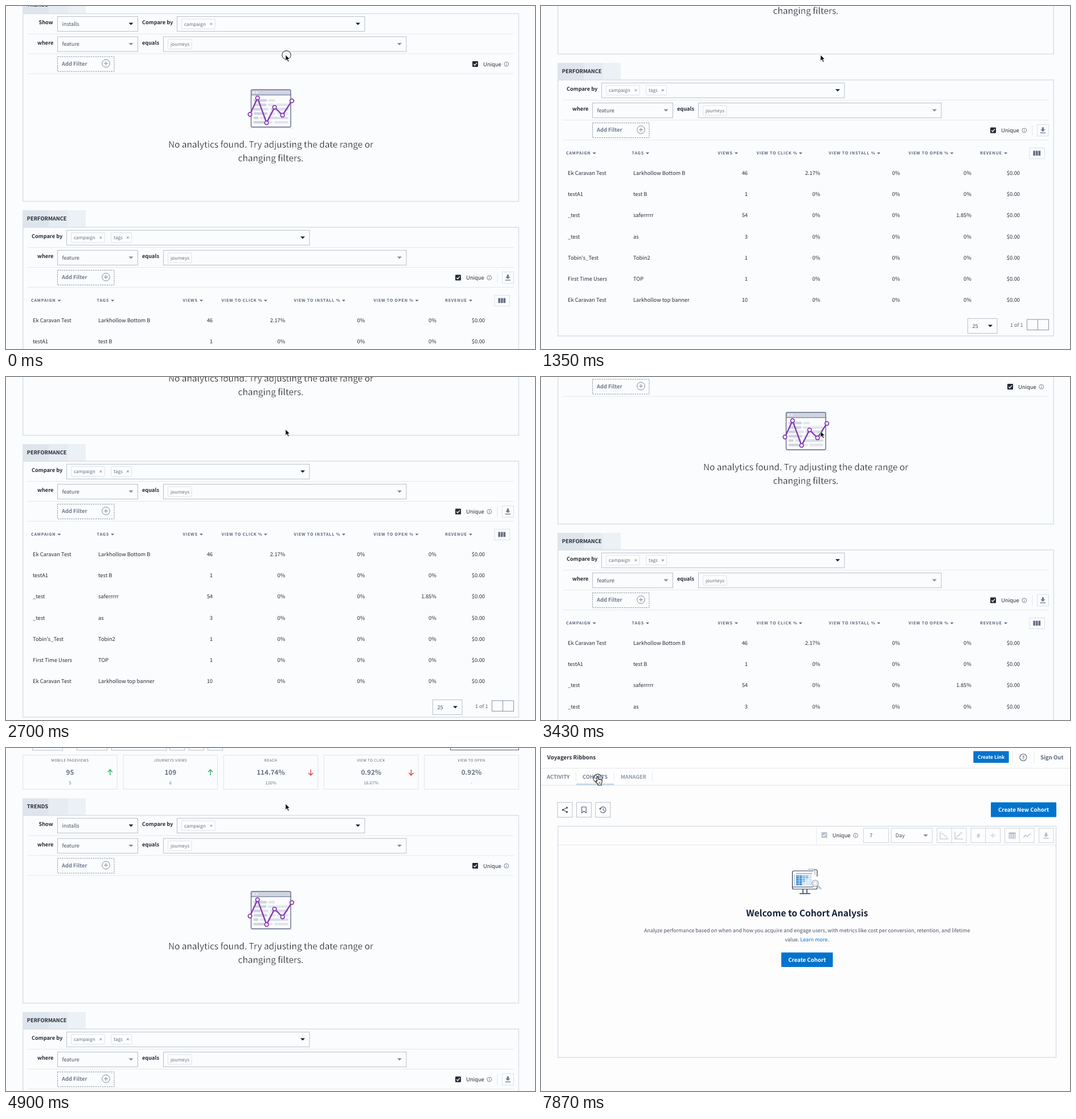
These frames come from a looping animation (929x603 px, 8 s). An HTML page:

```html
<!DOCTYPE html>
<html lang="en">
<head>
<meta charset="utf-8">
<title>Analytics dashboard</title>
<style>
html, body { margin: 0; width: 100%; height: 100%; overflow: hidden; background: #fbfcfd; }
svg { display: block; width: 100vw; height: 100vh; }
text { font-family: "Noto Sans CJK JP", "Noto Sans CJK SC", "Noto Sans CJK KR", "Noto Sans CJK", sans-serif;
  text-rendering: geometricPrecision; white-space: pre; }
</style>
</head>
<body>
<svg id="stage" viewBox="0 0 929 603" xmlns="http://www.w3.org/2000/svg"></svg>
<script>
const INK = '#262d39', MUTED = '#6c7888', BLUE = '#0273cc', EDGE = '#b7c1ca', PANEL = '#d8e0e7', RULE = '#e4e8ed';
const STEP = 148.5, LOOP = 8000;

const text = (x, y, s, size = 9.3, fill = INK, bold = 0, anchor = 'start', extra = '') =>
  `<text x="${x}" y="${y}" font-size="${size}" fill="${fill}" font-weight="${bold ? 700 : 400}" text-anchor="${anchor}" ${extra}>${s}</text>`;
const box = (x, y, w, h, stroke = EDGE, fill = 'none', extra = '') =>
  `<rect x="${x}" y="${y}" width="${w}" height="${h}" stroke="${stroke}" fill="${fill}" ${extra}/>`;
const path = (d, stroke, w = 1, fill = 'none', extra = '') =>
  `<path d="${d}" stroke="${stroke}" stroke-width="${w}" fill="${fill}" ${extra}/>`;
const circle = (x, y, r, stroke, w = 1, fill = 'none') =>
  `<circle cx="${x}" cy="${y}" r="${r}" stroke="${stroke}" stroke-width="${w}" fill="${fill}"/>`;
const group = (x, y, s, id = '') => `<g ${id && `id="${id}"`} transform="translate(${x} ${y})">${s}</g>`;
const hline = (x1, x2, y, c = RULE) => path(`M${x1} ${y}H${x2}`, c);
const vline = (x, y1, y2, c = RULE) => path(`M${x} ${y1}V${y2}`, c);
const caret = (x, y, c = '#15181d', r = 4) => path(`M${x - r} ${y - r / 2}h${2 * r}l${-r} ${r}z`, 'none', 0, c);

const select = (x, y, w, label = '', c) => box(x, y, w, 26) +
  text(x + 8, y + 16, label, 9.2, '#4a5260') + caret(x + w - 12, y + 13, c);
const chip = (x, y, w, label, closable) => box(x, y, w, 17, '#dde2e8', '#fdfdfe', 'rx="1"') +
  text(x + 4.5, y + 11.6, label, 8.2, '#66717f') +
  (closable ? path(`M${x + w - 8.4} ${y + 6.8}l3.6 3.6m0-3.6l-3.6 3.6`, '#66717f', .9) : '');
const info = (x, y) => circle(x, y, 3.9, '#65758a', .9) + path(`M${x} ${y - 2.3}v1M${x} ${y - .5}v2.7`, '#65758a', .9);
const check = (x, y, c = '#252c38') => box(x, y, 10, 10, 'none', c, 'rx="1"') +
  path(`M${x + 2.2} ${y + 5.2}l2 2l3.8-4.3`, '#fff', 1.3);
const button = (x, y, w, h, label, size) => box(x, y, w, h, 'none', BLUE, 'rx="1"') +
  text(x + w / 2, y + h / 2 + 3.4, label, size, '#fff', 1, 'middle');
const download = (x, y, c) => path(`M${x - 1.6} ${y - 5}h3.2v3.6h2.6l-4.2 4l-4.2-4h2.6z`, 'none', 0, c) +
  path(`M${x - 4.8} ${y + 4.7}h9.6`, c, 1.3);

function tools(x, y) {
  const c = '#4d5969', at = i => x + i * 33.4;
  return [0, 1, 2].map(i => box(at(i) - 13, y - 13, 26, 26)).join('') +
    path(`M${x + 3.5} ${y - 3.8}L${x - 3.5} ${y}l7 3.8`, c, 1.1) +
    [[3.5, -3.8], [-3.5, 0], [3.5, 3.8]].map(p => circle(x + p[0], y + p[1], 1.7, 'none', 0, c)).join('') +
    path(`M${at(1) - 3.8} ${y - 5}h7.6v10.3l-3.8-3l-3.8 3z`, c, 1.1) +
    path(`M${at(2) - 4.6} ${y - 2.4}a5.2 5.2 0 1 1 0 4.8M${at(2) + .5} ${y - 3}v3.4l2.5 1.5`, c, 1.1) +
    path(`M${at(2) - 7} ${y - 2.6}h4.6l-2.4 3z`, 'none', 0, c);
}

function calendar(x, y) {
  let s = box(x - 4.3, y - 3.6, 8.6, 8.4, '#3d4653') + box(x - 4.5, y - 4, 9, 2.4, 'none', '#3d4653') +
    path(`M${x - 2.2} ${y - 5.4}v2m4.4-2v2`, '#3d4653', 1.3);
  for (let i = 0; i < 2; i++) s += hline(x - 4, x + 4, y + .7 + i * 2, '#7d8793') + vline(x - 1.4 + i * 2.8, y - 1, y + 4, '#7d8793');
  return s;
}

function card(i, label, value, small, dir) {
  const x = 29.7 + i * 176.25, m = x + 82.8, c = dir > 0 ? '#27b561' : '#d34545';
  const arrow = dir ? path(`M${x + 153} ${163 + 5 * dir}v${-10 * dir}m-4 ${4.2 * dir}l4 ${-4.2 * dir}l4 ${4.2 * dir}`, c, 1.4) : '';
  return box(x, 132.5, 165.5, 60, '#e0e5ea') +
    text(m, 144, label, 6.35, '#566377', 0, 'middle', 'letter-spacing=".45"') +
    text(m, 167, value, 11.7, '#667283', 1, 'middle') +
    text(m, 184, small, 7.6, MUTED, 0, 'middle') + arrow;
}

// Tab, frame and the shared filter rows; y is the frame's top edge
function panel(y, h, title, first, shift) {
  const grey = '#85898f';
  return box(29, y - 30, 46, 30, 'none', '#dfe5ec') + box(75, y - 30, 34, 30, 'none', '#e6ecf2') +
    box(109, y - 30, 31, 30, 'none', '#ebf1f5') + text(36.8, y - 12.3, title, 9.3, INK, 1) +
    box(29.7, y, 870.6, h, PANEL, 'none', 'stroke-width="1.5"') + first +
    hline(38, 892, y + 35.5) +
    text(55, y + 54, 'where', 9.2, INK, 1) + select(90.5, y + 40.5, 141, 'feature', grey) +
    text(239, y + 54, 'equals', 9.2, INK, 1) + select(276.5, y + 40.5, 426.5, '', grey) + chip(284.5, y + 45, 41.5, 'journeys') +
    hline(38, 892, y + 70.5) +
    box(90.5, y + 75.5, 99.5, 26, '#8592a3', 'none', 'stroke-dasharray="2.4 1.5"') +
    text(98, y + 91.2, 'Add Filter', 9.3, '#6f7c8e', 1) +
    circle(175.5, y + 87.5, 6.8, '#7c899a') + path(`M172 ${y + 87.5}h7m-3.5-3.5v7`, '#7c899a') +
    check(819 - shift, y + 83.5) + text(838 - shift, y + 92.2, 'Unique', 9.4) + info(878.8 - shift, y + 88.7) +
    hline(38, 892, y + 105.5);
}

function chart() {
  const pts = [[428.5, 415.5], [441.7, 386.7], [457.6, 430.4], [471.6, 403], [485.6, 417], [502, 391.7]];
  let s = box(430.5, 372.3, 69.5, 65.5, 'none', '#fbfcfe') + box(430.5, 372.3, 69.5, 9, 'none', '#cfd4e1') +
    circle(435, 376.8, 1.3, 'none', 0, '#fff') + circle(440.5, 376.8, 1.3, 'none', 0, '#fff');
  const bar = (x, y, w, c) => box(x, y - 2.3, w, 4.6, 'none', c, 'rx="2.3"');
  for (let i = 0; i < 6; i++) {
    const y = 391 + i * 7.7, a = [24, 23, 13, 25, 9, 20][i];
    s += bar(434.5, y, a, '#ced3df') + bar(436.5 + a, y, 12, '#e1e5ee');
    if (i) s += bar(451 + a, y, 45 - a, i % 2 ? '#e1e5ee' : '#d9dde8');
  }
  return s + box(430.5, 372.3, 69.5, 65.5, '#626b8c', 'none', 'rx="2" stroke-width="1.4"') +
    hline(430, 501, 381.4, '#626b8c') + hline(426, 505, 439.6, '#e1e5ef') +
    path('M' + pts.join('L'), '#8539b0', 2.4, 'none', 'stroke-linejoin="round"') +
    pts.map(p => circle(...p, 3.3, '#8539b0', 1.7, '#fff')).join('');
}

function trends() {
  const y = 238.5;
  const first = text(57.5, y + 18.7, 'Show', 9.2, INK, 1) + select(90.5, y + 5, 141, 'installs') +
    text(239, y + 18.7, 'Compare by', 9.2, INK, 1) + select(300.5, y + 5, 329.5) + chip(308.5, y + 9.5, 58.5, 'campaign', 1);
  // A thin outline in the page colour lightens the strokes
  const big = (yy, s) => text(465, yy, s, 15.4, '#14171f', 0, 'middle', 'stroke="#fbfcfd" stroke-width=".36"');
  return panel(y, 330, 'TRENDS', first, 0) + chart() +
    big(473.7, 'No analytics found. Try adjusting the date range or') + big(498.2, 'changing filters.');
}

function performanceTable() {
  const y = 614;
  const first = text(45, y + 18.7, 'Compare by', 9.2, INK, 1) + select(106.5, y + 5.3, 426.5) +
    chip(114.5, y + 9.5, 58.5, 'campaign', 1) + chip(184.5, y + 9.5, 36, 'tags', 1);
  let s = panel(y, 450, 'PERFORMANCE', first, 30) + vline(863, 693, 712) +
    box(871.5, 692.5, 20, 20, '#dbe1e7') + download(881.3, 702.3, '#6b788a');
  const heads = [['CAMPAIGN', 44, 93.5], ['TAGS', 159.5, 187], ['VIEWS', 310.5, 343], ['VIEW TO CLICK %', 378.5, 455.8],
    ['VIEW TO INSTALL %', 505.5, 593], ['VIEW TO OPEN %', 645.5, 721.5], ['REVENUE', 771, 816]];
  for (const [h, x, c] of heads)
    s += text(x, 745.4, h, 7.1, '#586580', 1, 'start', 'letter-spacing=".83"') + caret(c, 743, '#59667a', 3);
  s += box(858, 733.5, 26.5, 19, '#dbe1e7');
  for (let i = 0; i < 3; i++) s += box(864.3 + i * 4.6, 738.5, 3.7, 8.6, 'none', '#667085');
  const rows = [['Ek Caravan Test', 'Larkhollow Bottom B', 46, '2.17%'], ['testA1', 'test B', 1], ['_test', 'saferrrrr', 54, '0%', '1.85%'],
    ['_test', 'as', 3], ["Tobin's_Test", 'Tobin2', 1], ['First Time Users', 'TOP', 1], ['Ek Caravan Test', 'Larkhollow top banner', 10]];
  rows.forEach(([name, tag, views, click = '0%', open = '0%'], i) => {
    const b = 780.6 + i * 37.3;
    s += text(47, b, name) + text(162, b, tag);
    [[363, views], [490.3, click], [630.3, '0%'], [755.8, open], [841, '$0.00']].forEach(([x, v]) => s += text(x, b, v, 9.3, INK, 0, 'end'));
  });
  return s + select(749.5, 1033.5, 51.5, '25') + text(824, 1047.7, '1 of 1', 9, '#5c6574') +
    box(853.5, 1035, 38, 18.5, '#8a95a5') + vline(872.5, 1035, 1053.5, '#8a95a5');
}

function header() {
  const tab = (x, s, id) => text(x, 55.8, s, 9.2, '#8d9aaa', 1, 'start', `id="${id}"`);
  return box(0, 0, 929, 67, 'none', '#fefefe') + text(10.8, 22.3, 'Voyagers Ribbons', 9.8, '#272d38', 1) +
    hline(0, 929, 37.5) + hline(0, 929, 67.5, '#dfe4e9') +
    [61.5, 128.5, 195.5].map(x => vline(x, 45, 60)).join('') +
    tab(10.3, 'ACTIVITY', 'activity') + tab(73, 'COHORTS', 'cohorts') + tab(140, 'MANAGER', 'manager') +
    box(0, 64.5, 62, 2.6, 'none', BLUE, 'id="bar"') +
    group(0, 0, button(754.7, 7.5, 62.3, 20.5, 'Create Link', 8.5) + vline(823.5, 8, 29) + vline(861.5, 8, 29) +
      circle(842.3, 18.5, 6, '#59667a', 1.1) + text(842.3, 21.7, '?', 8.6, '#59667a', 1, 'middle') +
      text(872.3, 22.3, 'Sign Out', 9.65, '#59667a', 1), 'account');
}

function dashboard() {
  return calendar(34, 111) + box(46.5, 98, 53, 26) + text(73, 114.6, '03/13', 9.4, '#4a5260', 0, 'middle') +
    calendar(112, 111) + box(124.5, 98, 53, 26) + text(151, 114.6, '03/20', 9.4, '#4a5260', 0, 'middle') +
    select(185.5, 98, 96.5, 'Last 7 days') + tools(300.7, 111) +
    box(780.5, 98, 120, 25.5, '#5b677a') + text(840.3, 114.4, 'Create New Journey', 9.7, '#5b677a', 1, 'middle') +
    card(0, 'MOBILE PAGEVIEWS', '95', '5', 1) + card(1, 'JOURNEYS VIEWS', '109', '6', 1) +
    card(2, 'REACH', '114.74%', '120%', -1) + card(3, 'VIEW TO CLICK', '0.92%', '16.67%', -1) +
    card(4, 'VIEW TO OPEN', '0.92%', '-', 0) + trends() + performanceTable();
}

function monitor() {
  const c = '#2c3d57';
  let s = path('M479 214h4.5q1.5 0 1.5 2v10M485 238v8q0 2-2 2h-39.5q-2 0-2-2v-27q0-3 3-3h34', c, 1.2) +
    path('M469 213h10q2 0 2 2v8', '#8b96a6') + hline(442, 478, 244.3, c) +
    path('M460 248v7m7-7v7M454 256h19', c, 1.5) + hline(448, 476, 221, '#4d86bd') + vline(445, 222, 242, '#9ab');
  for (let r = 0; r < 6; r++) for (let k = 0; k < 5; k++)
    s += box(448 + k * 5.6, 224 + r * 3, 4.8, 2.2, 'none', k < 2 ? '#1f7fd0' : k < 4 - r / 2 ? '#74afe0' : '#c9dff2');
  return s + circle(481.5, 238, 5.6, '#a0a8b2', 1.4, '#fcfdfe') + circle(481.5, 238, 3.3, '#c5cbd2') +
    path('M486 242l6 6', '#a0a8b2', 2.6) + path('M486 242l6 6', '#fff', .8);
}

function cohortPage() {
  const c = '#b2bac5', e = '#ccd4dc';
  let s = box(0, 66, 929, 537, 'none', '#fdfdfe') + tools(42, 108.7) +
    button(790, 95.5, 115, 26, 'Create New Cohort', 9.65) +
    box(29.7, 137.5, 874.8, 406.5, PANEL, 'none', 'stroke-width="1.5"') + hline(30, 904, 170.5) + vline(483.5, 138, 170) +
    check(492.5, 148, '#b9c1cb') + text(511.8, 156.8, 'Unique', 9.4) + info(552.5, 153.8) +
    box(566.5, 141, 44, 25.5, e) + text(577, 157.3, '7', 9.2, '#4a5260') +
    box(615, 141, 72, 25.5, e) + text(622.5, 157.3, 'Day', 9.2, '#4a5260') + caret(675.5, 154, '#85898f');
  for (const x of [695.5, 755, 814.5]) s += box(x, 141, 51.5, 25.5, e) + vline(x + 25.7, 141, 166.5, e);
  for (const x of [701, 727]) s += path(`M${x} 147v13h14`, c);
  s += path('M703 151q2-2 4 1t4 3l3 4M729 159q1-5 4-5t3-3t4-2', c) +
    text(768, 158, '#', 10.5, c, 1, 'middle') + text(793.5, 158, '÷', 11, c, 1, 'middle') +
    box(822, 149, 11, 10, c) + box(822, 149, 11, 2.6, 'none', c) + hline(822, 833, 154, c) + hline(822, 833, 156.6, c) +
    vline(825.7, 150, 159, c) + vline(829.3, 150, 159, c) + path('M847.5 157l3.5-4l3 2.7l5-5', c, 1.3) +
    box(874.5, 141, 25.5, 25.5, e) + download(887, 153.8, c);
  return s + monitor() + text(467.2, 295.6, 'Welcome to Cohort Analysis', 15.7, '#14213a', 1, 'middle') +
    text(467.2, 324.2, 'Analyze performance based on when and how you acquire and engage users, with metrics like cost per conversion, retention, and lifetime', 9, '#4b5361', 0, 'middle') +
    text(467, 339.9, `value. <tspan fill="${BLUE}">Learn more</tspan>.`, 9, '#4b5361', 0, 'middle') +
    button(422, 359.5, 90.5, 25.5, 'Create Cohort', 9.7);
}

const arrowShape = path('M0 0v10.8l2.5-2.3l1.9 4.2l2-.9l-1.9-4.1h3.4z', '#fff', .9, '#0b0b0d');
const handShape = path('M0 1.2q1.4-1.7 2.4.2l.8 4q1.3-1.2 2 .2q1.3-.9 2 .4q1.6-.6 1.9 1.2q.5 2.8-1.2 5.6v2.4h-6v-1.9q-2.7-2.2-4-4.6q.3-1.9 2.5-.3z', '#15171a', 1.1, '#fff') +
  path('M3.8 9.8v3m1.8-3v3', '#15171a', .7);

const $ = id => document.getElementById(id);
$('stage').innerHTML =
  `<g id="page">${header()}<g id="board">${dashboard()}</g></g><g id="cohortView">${cohortPage()}</g>` +
  group(0, 0, circle(1.7, .5, 7.7, '#15171a', 1), 'ring') + group(0, 0, arrowShape, 'arrow') + group(0, 0, handShape, 'hand');

// Straight segments between [step, value] pairs
function track(keys, n) {
  const i = keys.findIndex(k => k[0] >= n);
  if (i < 0) return keys[keys.length - 1][1];
  if (!i) return keys[0][1];
  const [a, u] = keys[i - 1], [b, v] = keys[i];
  return u + (v - u) * (n - a) / (b - a);
}
const SCROLL = [[0, 225], [3, 222.5], [5, 222.5], [9, 484], [12, 490], [15, 486], [18, 466], [21, 400], [24, 265],
  [27, 162.5], [30, 131], [33, 120], [34, 120], [36, 66], [38, 17], [40, 0], [41, 0], [44, 2]];
const CURSOR_X = [[41, 490.8], [43, 410], [46, 165], [48, 98]];
const CURSOR_Y = [[0, 85.7], [12, 86], [18, 92], [27, 98], [41, 98], [43, 88], [46, 58], [48, 50]];

const move = (id, x, y) => $(id).setAttribute('transform', `translate(${x} ${y})`);
const show = (id, on) => $(id).setAttribute('display', on ? 'inline' : 'none');
const paint = (id, c) => $(id).setAttribute('fill', c);

function render(ms) {
  const n = Math.min(53, Math.floor((ms + 12) / STEP));
  const done = n >= 53, x = track(CURSOR_X, n), y = track(CURSOR_Y, n);
  const hover = x < 195 && y < 66, onCohorts = hover && x < 128;
  move('page', 0, -Math.round(track(SCROLL, n) * 2) / 2);
  move('account', done ? 4.6 : 0, 0);
  show('board', !done);
  show('cohortView', done);
  paint('activity', done ? '#738091' : '#4b5a6f');
  paint('cohorts', onCohorts ? '#738091' : '#8d9aaa');
  paint('bar', done ? '#c6d7e6' : BLUE);
  $('bar').setAttribute('x', done ? 62 : 0);
  $('bar').setAttribute('width', done ? 66.5 : 62);
  show('arrow', !hover);
  show('hand', hover);
  show('ring', n === 0 || done);
  move('arrow', x, y);
  move('hand', x, y);
  move('ring', x, done ? y + 3 : y);
}

const start = performance.now();
function tick() {
  render((performance.now() - start) % LOOP);
  requestAnimationFrame(tick);
}
tick();
</script>
</body>
</html>
```
